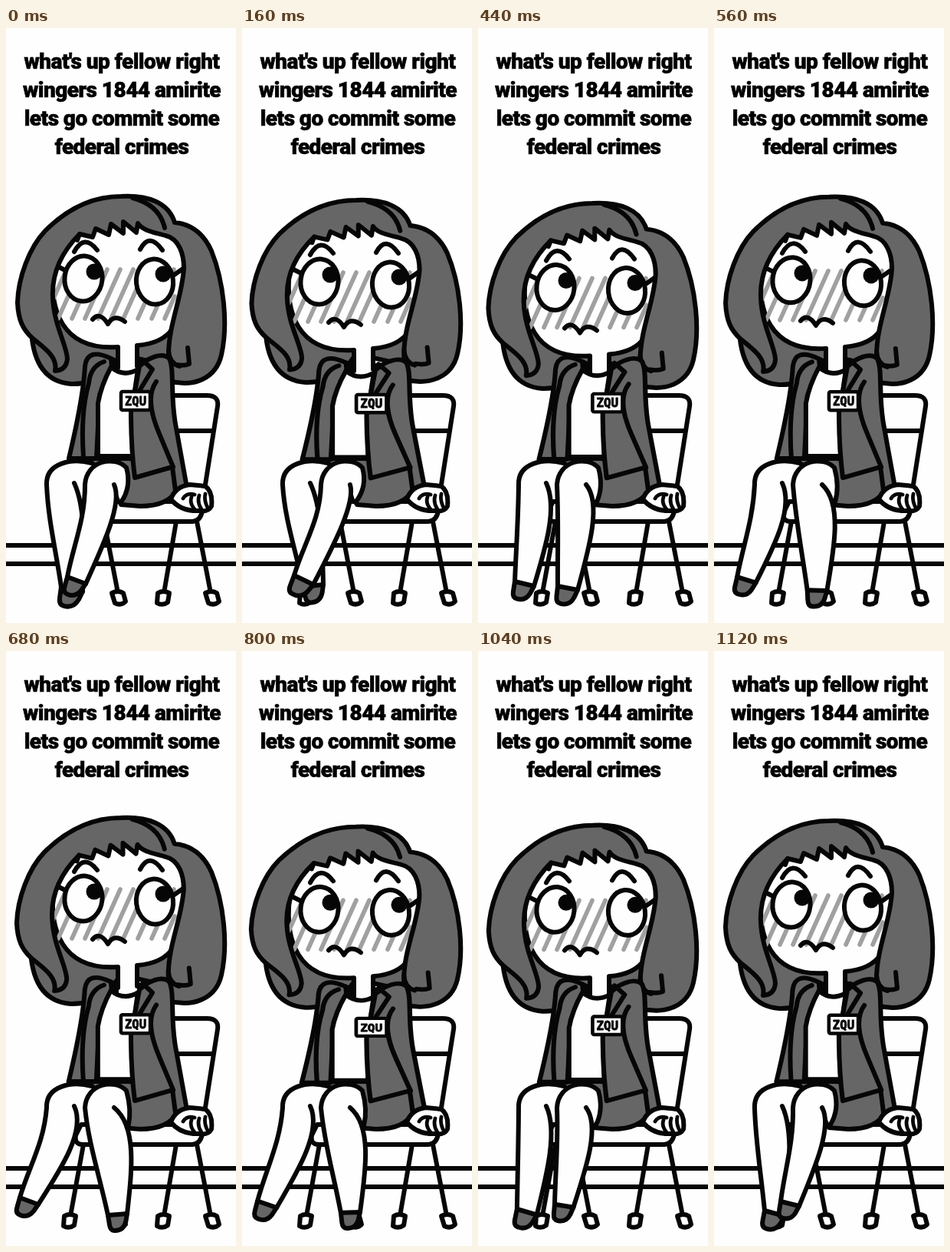
An HTML page for the animation above (1.16 s loop, 300 by 774 pixels).

```html
<!DOCTYPE html>
<html lang="en">
<head>
<meta charset="utf-8">
<title>Nervous sitter</title>
<style>
  html, body { margin: 0; width: 100%; height: 100%; overflow: hidden; background: #fefefe; }
  svg { display: block; width: 100vw; height: 100vh; }
  .line { fill: none; stroke: #060606; stroke-width: 6; stroke-linecap: round; stroke-linejoin: round; }
  .grey { fill: #666; }
  .white { fill: #fefefe; }
  .ink { fill: #060606; }
  .caption { font: 900 28px Roboto, "Open Sans", sans-serif; letter-spacing: -.55px; text-anchor: middle; stroke: #000; stroke-width: .6; }
  .badge { font: bold 15.5px "DejaVu Sans Mono", monospace; text-anchor: middle; fill: #060606; stroke: #060606; stroke-width: .8; }
  .blush { fill: none; stroke: #a0a0a0; stroke-width: 5.6; stroke-linecap: round; }
</style>
</head>
<body>
<svg viewBox="0 0 300 774">
  <g class="caption">
    <text x="151" y="53">what's up fellow right</text>
    <text x="151" y="90">wingers 1844 amirite</text>
    <text x="151" y="127">lets go commit some</text>
    <text x="151" y="164">federal crimes</text>
  </g>

  <!-- floor and chair -->
  <g class="line">
    <path stroke-linecap="butt" d="M0,673H300M0,697H300"/>
    <path d="M101,642L84,735M128,642L146,735M222,642L206,735M249,642L267,735"/>
    <g class="white">
      <path id="footL" d="M76,735Q83,731 91,735L89,747Q82,752 75,748Z"/>
      <use href="#footL" x="122"/>
      <path id="footR" d="M138,735Q146,731 153,735L156,746Q150,752 142,748Z"/>
      <use href="#footR" x="122"/>
      <path d="M208,478H262Q278,478 276,492L254,632L236,632Z"/>
      <path d="M218,524H270"/>
      <path d="M98,616L91,630Q89,642 100,642H243Q254,641 256,628L252,616Z"/>
    </g>
  </g>

  <!-- hair behind the face -->
  <g class="hair line">
    <path class="grey" d="M33,395C35,425 45,460 85,463C125,464 140,440 150,425L215,440L220,300H60Z"/>
  </g>

  <!-- face -->
  <g id="face" class="line">
    <path class="white" stroke="none" d="M62,312C56,365 72,420 146,415V446H171V413Q205,410 218,388L236,300L215,262L96,262Z"/>
    <path d="M62,312C56,365 72,420 146,415V442M171,440V413Q205,410 217,391"/>
    <path class="blush" d="M78,316l-17,38M97,314l-29,64M115,314l-29,64M132,314l-29,64M149,314l-29,64M166,314l-29,64M182,314l-29,64M201,314l-29,64M219,314l-29,64M220,349l-13,29"/>
    <path d="M61,307L77,315M218,322L231,313"/>
    <ellipse class="white" cx="101" cy="326" rx="24.5" ry="29.5" transform="rotate(6 101 326)"/>
    <ellipse class="white" cx="194" cy="330" rx="24" ry="29.5" transform="rotate(-6 194 330)"/>
    <g class="ink" stroke="none">
      <circle cx="115" cy="317" r="10.5"/>
      <circle cx="205" cy="320" r="10.5"/>
    </g>
    <path d="M89,291Q102,267 119,289M175,288Q187,265 204,289"/>
    <path d="M113,379Q122,368 133,385Q141,371 155,382"/>
  </g>

  <!-- hair in front -->
  <g class="hair line">
    <path class="grey" d="M150,219C105,219 72,243 51,264C30,286 16,325 15,357C16,380 22,392 34,403
      C48,415 68,427 64,446Q79,445 80,430C79,412 62,385 61,350Q59,305 96,268L113,272L117,261L134,269L137,255L153,267L153,252L170,266L172,254
      C178,264 195,266 208,270C226,274 232,295 232,312C230,350 212,385 212,425V459
      C245,468 274,456 281,425C290,385 284,330 268,290C258,268 242,255 220,253C212,227 185,217 150,219Z"/>
    <path d="M165,221Q200,230 207,260M96,268L93,276M212,420Q213,436 226,440"/>
    <path id="curl" d="M222,438Q232,440 239,437L237,416"/>
  </g>

  <!-- skirt -->
  <path class="line grey" d="M104,560H160L218,568L224,600Q212,622 175,622L150,620L130,580Z"/>

  <!-- jacket and shirt -->
  <g id="torso" class="line">
    <path class="grey" d="M137,430Q106,415 103,440Q101,480 82,560H118L122,478L138,440Z"/>
    <path d="M128,434Q110,440 108,462Q97,500 101,558"/>
    <path class="white" d="M137,441Q153,455 172,444L164,500L165,557H120V488Q124,465 137,441Z"/>
    <path class="ink" stroke-width="2" d="M137,428L146,432V444L136,441Z M171,432L178,432L173,444Z"/>
    <path class="grey" d="M174,440L184,432Q204,421 213,430C220,445 214,475 221,515L236,598L221,602L217,571L168,585Q163,545 163,500Z"/>
    <path d="M178,432L191,444L174,472M196,460C185,475 188,500 200,528L218,571"/>
    <rect class="white" x="150" y="473" width="38" height="24" rx="2" stroke-width="4.5"/>
    <text class="badge" x="169" y="491">ZQU</text>
  </g>

  <!-- hand -->
  <g class="line">
    <path class="white" d="M215,613Q221,596 240,594L260,596Q270,603 268,622Q264,630 252,628Q228,629 215,613Z"/>
    <path d="M231,612Q236,604 246,607M246,626Q239,618 242,610M255,626Q249,617 252,608M263,624Q258,614 260,606" stroke-width="4.8"/>
  </g>

  <g id="backLeg"></g>
  <g id="frontLeg"></g>
</svg>
<script>
const LOOP = 1160, BOB = LOOP / 2, STEP = 40;
const byId = id => document.getElementById(id);

// time, then left x,y and right x,y of the ankle: back leg, front leg
const legKeys = [
  [0, 72, 727, 100, 733, 80, 714, 104, 723],
  [160, 80, 727, 106, 724, 68, 712, 93, 724],
  [280, 70, 728, 96, 734, 80, 719, 104, 729],
  [440, 48, 720, 73, 726, 104, 726, 130, 731],
  [680, 18, 711, 42, 720, 133, 734, 158, 732],
  [920, 31, 722, 57, 730, 117, 725, 142, 727],
  [1120, 66, 728, 92, 735, 87, 716, 111, 722]
];

// time, face drop, hair top drop, hair bottom drop, hair spread, shoulder drop
const bobKeys = [
  [0, 0, 0, 0, 0, 0],
  [100, -4, -2, -4, 2, 0.5],
  [160, 4, 5, -2, 5, 5.5],
  [280, 15, 13, 3, 7, 7],
  [340, 14, 12, 2, 8, 6],
  [440, 11.5, 9, 6, 3, 4],
  [540, 4, 2, 2, 0, 1]
];

// Smooth periodic curve through the keys
function sample(keys, period, t) {
  t %= period;
  const n = keys.length;
  const at = i => {
    const turn = Math.floor(i / n), k = keys[i - turn * n];
    return [k[0] + turn * period, ...k.slice(1)];
  };
  let i = n - 1;
  while (keys[i][0] > t) i--;
  const [p, a, b, q] = [-1, 0, 1, 2].map(d => at(i + d));
  const h = b[0] - a[0], u = (t - a[0]) / h;
  return a.slice(1).map((v, j) => {
    j++;
    const m = (b[j] - p[j]) / (b[0] - p[0]) * h;
    const w = (q[j] - a[j]) / (q[0] - a[0]) * h;
    const d = b[j] - v;
    return v + u * (m + u * (3 * d - 2 * m - w + u * (m + w - 2 * d)));
  });
}

const mix = (a, b, k) => [a[0] + (b[0] - a[0]) * k, a[1] + (b[1] - a[1]) * k];
const pt = p => p.map(v => v.toFixed(1)).join();

function addPath(parent, cls) {
  const el = document.createElementNS("http://www.w3.org/2000/svg", "path");
  el.setAttribute("class", cls);
  byId(parent).append(el);
  return el;
}

function makeLeg(id, shape) {
  const skin = addPath(id, "white"), shoe = addPath(id, "line grey"), edge = addPath(id, "line");
  return ([ax, ay, bx, by]) => {
    const a = [ax, ay], b = [bx, by], { top, knee, shin, crease } = shape;
    const calf = shape.calf(bx);
    const front = `${top}C${pt(shin(ax))} ${pt(mix(a, knee, .35))} ${pt(a)}`;
    const half = pt(mix(b, calf, .5));
    const foot = (s, d) => pt([ax + s * (bx - ax) - d * (by - ay), ay + s * (by - ay) + d * (bx - ax)]);
    skin.setAttribute("d", `${front}L${pt(b)}C${half} ${pt(calf)} ${crease}${shape.thigh(bx)}Z`);
    shoe.setAttribute("d", `M${pt(a)}L${foot(.04, .5)}Q${foot(.06, .82)} ${foot(.3, .82)}Q${foot(.75, .85)} ${foot(.9, .4)}L${pt(b)}Z`);
    edge.setAttribute("d", `${front}M${crease}C${pt(calf)} ${half} ${pt(b)}${shape.hem(bx)}`);
  };
}

const backLeg = makeLeg("backLeg", {
  top: "M112,566C85,559 52,566 53,594", knee: [53, 594],
  shin: ax => [53 + (ax - 53) * .1, 640],
  calf: () => [104, 624],
  crease: "89,592", thigh: () => "L112,618", hem: () => ""
});
const hemX = bx => 150 + (bx - 104) * .18;
const frontLeg = makeLeg("frontLeg", {
  top: "M157,572C142,556 105,562 103,594", knee: [103, 594],
  shin: ax => [104 + (ax - 90) * .08, 640],
  calf: bx => [152 + (bx - 104) * .35, 618],
  crease: "141,594",
  thigh: bx => `L${hemX(bx)},617Q165,597 157,572`,
  hem: bx => `M157,572Q164,597 ${hemX(bx)},617`
});

function draw(now) {
  const t = Math.floor(now % LOOP / STEP) * STEP;
  const legs = sample(legKeys, LOOP, t);
  backLeg(legs.slice(0, 4));
  frontLeg(legs.slice(4));

  const [face, top, bottom, spread, shoulder] = sample(bobKeys, BOB, t);
  byId("face").setAttribute("transform", `translate(0 ${face})`);
  const sx = 1 + spread * .5 / 271, sy = 1 + (bottom - top) / 244;
  for (const el of document.querySelectorAll(".hair"))
    el.setAttribute("transform", `matrix(${sx} 0 0 ${sy} ${285 * (1 - sx)} ${219 + top - 219 * sy})`);
  byId("curl").setAttribute("transform", `translate(${spread} 0)`);
  const tx = 1 + shoulder * .0065, ty = 1 - shoulder / 177;
  byId("torso").setAttribute("transform", `translate(175 600) scale(${tx} ${ty}) translate(-175 -600)`);
}

function tick() {
  draw(performance.now());
  requestAnimationFrame(tick);
}
tick();
</script>
</body>
</html>
```
